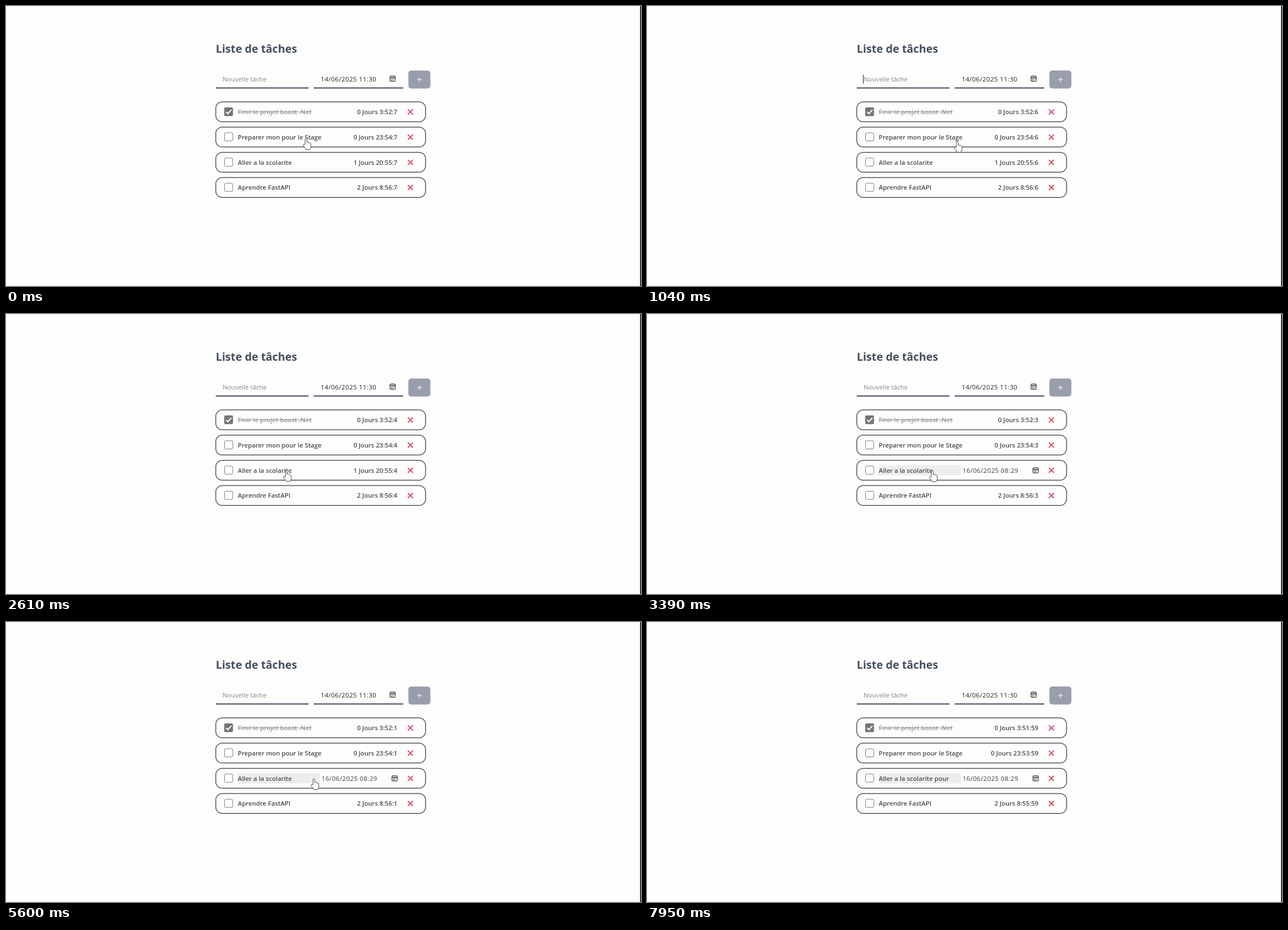
Recreate the animation shown at these times as an HTML page. Size 1126 by 497 pixels, loop 8 s.

```html
<!DOCTYPE html>
<html lang="fr">
<head>
<meta charset="utf-8">
<title>Liste de tâches</title>
<style>
  html, body { margin: 0; width: 100%; height: 100%; overflow: hidden; background: #fdfdfd; }
  svg { display: block; width: 1126px; height: 497px; font: 600 11.2px "Open Sans", "Noto Sans", sans-serif; }
  text { white-space: pre; fill: #4a4a4e; }
  .title { font-size: 19.4px; font-weight: 700; fill: #434f5c; }
  .hint { font-size: 11.3px; font-weight: 400; fill: #85858a; }
  .date { font-size: 11.3px; font-weight: 400; letter-spacing: .45px; fill: #222; }
  .row .date { fill: #3c3c40; }
  .time { text-anchor: end; }
  .done { fill: #98989c; text-decoration: line-through; }
  .card { fill: none; stroke: #595653; stroke-width: 1.5; }
  .box { fill: #fff; stroke: #7c7c80; }
  .cross { stroke: #d84f5f; stroke-width: 1.8; }
  .underline { stroke: #43465f; stroke-width: 1.8; }
  .caret { stroke: #222; }
  #pointer path { fill: #fff; stroke: #4b4b50; stroke-linejoin: round; }
</style>
</head>
<body>
<svg viewBox="0 0 1126 497">
  <defs>
    <g id="calendar" fill="none" stroke="#3a3a3c" stroke-width="1.2">
      <rect x="-4.6" y="-4.6" width="9.4" height="9.2" rx="1.6"/>
      <path d="M-4.6 -1.8H4.8" stroke-width="1.6"/>
      <path d="M-2.8 .6H3M-2.8 2.6H1" stroke-dasharray="1.4 .8"/>
    </g>
  </defs>
  <rect x="1124.5" width="1.5" height="497"/>
  <text class="title" x="372" y="83">Liste de tâches</text>
  <text class="hint" x="384" y="134">Nouvelle tâche</text>
  <text class="date" x="558" y="134">14/06/2025 11:30</text>
  <use href="#calendar" x="685.5" y="129"/>
  <path class="underline" d="M372 145.5H536.5M545.5 145.5H704.5"/>
  <rect x="713.5" y="114.5" width="39" height="32" rx="5" fill="#999eac"/>
  <path d="M729 130.5h8.4M733.2 126.3v8.4" stroke="#e0e4f6" stroke-width="1.5"/>
  <path id="newCaret" class="caret" d="M383.5 122v16"/>
  <g id="rows"></g>
  <path id="editCaret" class="caret" d="M0 269v17"/>
  <g id="pointer">
    <path id="hand" d="M-1.6 11V1.5Q-1.6 0 0 0T1.6 1.5V7Q3 5.8 4 7.4 5.4 6.5 6.4 8.2 8.4 7.6 8.7 9.6V14Q8.2 17 6.8 19.5H-.4Q-2 16 -5 12.6 -5.2 10.2 -3.4 10.4Z"/>
    <path id="arrow" d="M0 0V13L3 10.2 5 15 7 14.1 5 9.5H9Z"/>
  </g>
</svg>
<script>
const LOOP = 8000, STEP = 130;
const $ = id => document.getElementById(id);
const show = (el, on) => el.setAttribute('visibility', on ? 'visible' : 'hidden');

const tasks = [
  { label: 'Finir le projet boost .Net', left: [0, 3, 52], done: true },
  { label: 'Preparer mon pour le Stage', left: [0, 23, 54] },
  { label: 'Aller a la scolarite', left: [1, 20, 55] },
  { label: 'Aprendre FastAPI', left: [2, 8, 56] }
];
const rowY = i => 188 + 44.75 * i;

$('rows').innerHTML = tasks.map(({ label, done }, i) => {
  const y = rowY(i);
  const check = done
    ? `<rect x="387" y="${y - 8}" width="15.5" height="15.5" rx="2" fill="#747478"/>
       <path d="M390.3 ${y}l3.2 3.2 6.2-7" fill="none" stroke="#fff" stroke-width="2"/>`
    : `<rect class="box" x="387.5" y="${y - 7.7}" width="14.5" height="14.5" rx="2"/>`;
  return `<g class="row">
    <rect class="card" x="372" y="${y - 17.8}" width="372" height="35.4" rx="11.5"/>${check}
    ${i === 2 ? `<g id="editor"><rect x="411" y="268.5" width="145.5" height="18" fill="#ededf0"/>
      <text class="date" x="559.5" y="${y + 4}">16/06/2025 08:29</text>
      <use href="#calendar" x="689" y="277.5"/></g>` : ''}
    <text class="label${done ? ' done' : ''}" x="411" y="${y + 4}">${label}</text>
    <text class="time" x="694" y="${y + 4}"></text>
    <path class="cross" d="M712.6 ${y - 4.5}l9 9m0-9l-9 9"/></g>`;
}).join('');
const times = document.querySelectorAll('.time');
const editLabel = document.querySelectorAll('.label')[2];

// Pointer path: time, x, y of the tip
const path = [
  [0, 532, 235], [260, 543, 235], [780, 550, 240], [1040, 550, 240], [1820, 483, 276],
  [2470, 490, 277], [2740, 505, 278], [3390, 506, 278], [3910, 707, 281], [4040, 707, 281],
  [4430, 690.5, 282], [4680, 690.5, 282], [5340, 546, 278], [5600, 546, 278], [5860, 509, 278]
];
const EDIT_AT = 3120, CLICK_AT = 5850;
const keys = [[6370, ' '], [6620, 'p'], [6880, 'o'], [7150, 'u'], [7400, 'r']];

function pointerAt(t) {
  const i = path.findIndex(p => p[0] > t);
  if (i < 0) return path.at(-1).slice(1);
  const [a, b] = [path[i - 1], path[i]];
  const u = (t - a[0]) / (b[0] - a[0]);
  return [1, 2].map(k => a[k] + (b[k] - a[k]) * u);
}

function remaining([days, hours, minutes], elapsed) {
  const s = ((days * 24 + hours) * 60 + minutes) * 60 + 7 - elapsed;
  const h = Math.floor(s / 3600);
  return `${Math.floor(h / 24)} Jours ${h % 24}:${Math.floor(s / 60) % 60}:${s % 60}`;
}

function render(now) {
  const t = Math.floor(now % LOOP / STEP) * STEP;
  const editing = t >= EDIT_AT;
  const elapsed = Math.floor((t + 820) / 1000);

  times.forEach((el, i) => {
    el.textContent = remaining(tasks[i].left, elapsed);
    show(el, i !== 2 || !editing);
  });
  show($('editor'), editing);

  const typed = keys.filter(k => k[0] <= t);
  editLabel.textContent = tasks[2].label + typed.map(k => k[1]).join('');
  const lastInput = typed.length ? typed.at(-1)[0] : CLICK_AT;
  $('editCaret').setAttribute('transform', `translate(${411.5 + editLabel.getComputedTextLength()})`);
  show($('editCaret'), t >= CLICK_AT && (t - lastInput) % 1000 < 500);
  show($('newCaret'), t >= 650 && !editing && (t - 650) % 1000 < 500);

  const [x, y] = pointerAt(t);
  const visible = t < keys[0][0], overDate = editing && x > 557 && x < 704;
  $('pointer').setAttribute('transform', `translate(${x} ${y})`);
  show($('hand'), visible && !overDate);
  show($('arrow'), visible && overDate);
}

let start;
requestAnimationFrame(function frame(now) {
  start ??= now;
  render(now - start);
  requestAnimationFrame(frame);
});
</script>
</body>
</html>
```
